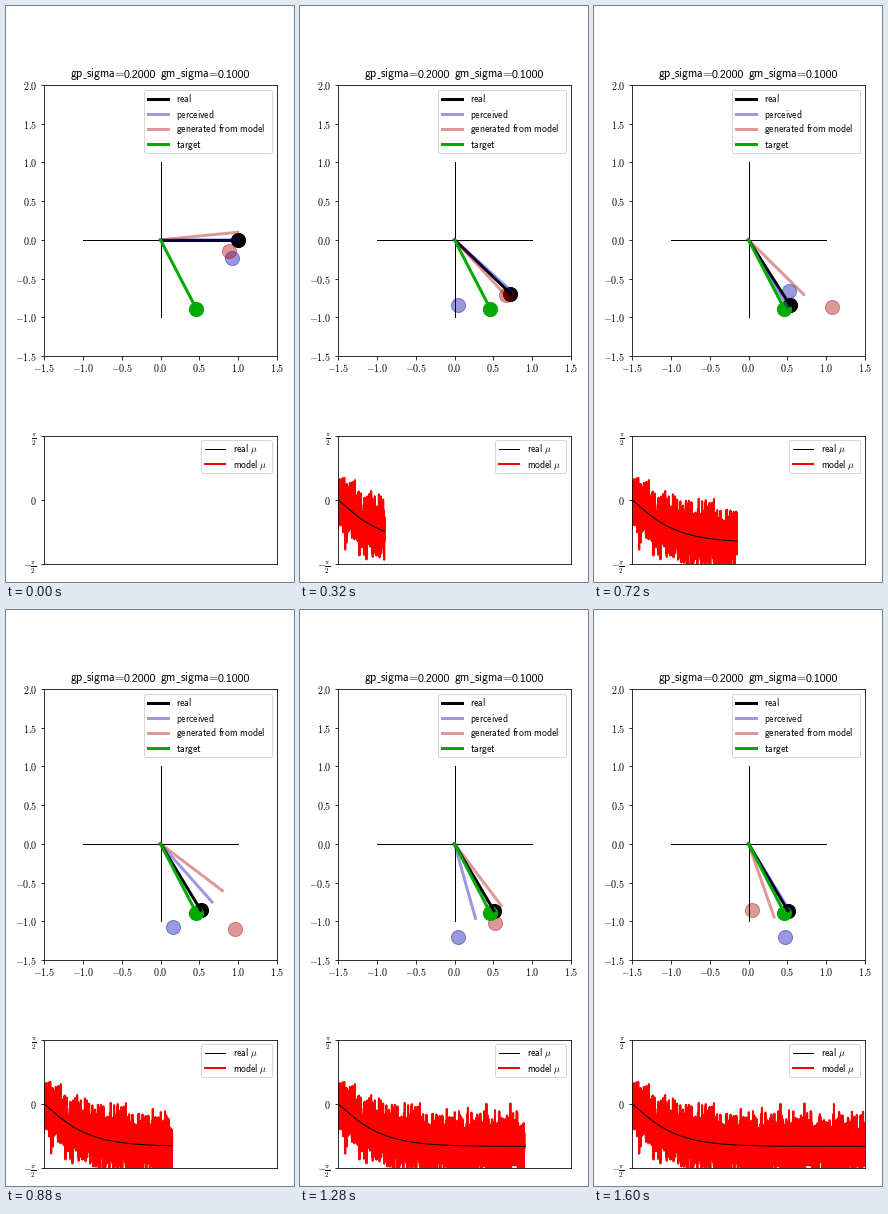
A matplotlib script for the animation above (1.68 s loop, 288 px wide and 576 px high).

```python
import numpy as np
import matplotlib.pyplot as plt
from matplotlib.animation import FuncAnimation
from matplotlib.patches import FancyBboxPatch

W, H, DPI = 288, 576, 72
FRAMES, INTERVAL = 21, 80
SAMPLES = 200  # model samples drawn per frame
BLUE, RED, GREEN = "#0000aa", "#aa0000", "#00aa00"
TARGET = -1.0926

plt.rcParams["mathtext.fontset"] = "cm"
rng = np.random.default_rng(7)


def mu(t):
    """Real angle, settling towards the target."""
    return -1.04 * (1 - np.exp(-(t / 3.13) ** 1.17))


def tip(angle):
    return np.array([np.cos(angle), np.sin(angle)])


def scatter_around(angle, spread):
    """A noisy spot near the tip of an arm, kept inside the plot."""
    spot = tip(angle) + rng.normal(0, spread, 2)
    return np.clip(spot, (-.39, -1.2), (1.44, .75))


def noisy_reading(t):
    seen = mu(t) + rng.normal(0, .2)
    model = mu(t) + rng.normal(0, .33)
    return seen, scatter_around(mu(t), .27), model, scatter_around(model, .25)


readings = [noisy_reading(t) for t in range(FRAMES)]
times = np.linspace(0, FRAMES - 1, (FRAMES - 1) * SAMPLES + 1)
real_mu = mu(times)
model_mu = real_mu + rng.normal(0, .33, times.size)

fig = plt.figure(figsize=(W / DPI, H / DPI), dpi=DPI, facecolor="white")


def axes_px(left, top, right, bottom):
    return fig.add_axes([left / W, 1 - bottom / H,
                         (right - left) / W, (bottom - top) / H])


# Pendulum plot
ax = axes_px(38, 79, 271, 350)
ax.set(xlim=(-1.5, 1.5), ylim=(-1.5, 2))
xt, yt = np.arange(-1.5, 1.6, .5), np.arange(-1.5, 2.1, .5)
ax.set_xticks(xt, [f"${v:.1f}$" for v in xt])
ax.set_yticks(yt, [f"${v:.1f}$" for v in yt])
ax.tick_params(axis="x", pad=3)
ax.plot([-1, 1], [0, 0], color="black", lw=1)
ax.plot([0, 0], [-1, 1], color="black", lw=1)


def make_arm(color, alpha=1):
    rod, = ax.plot([], [], color=color, lw=3, alpha=alpha)
    bob, = ax.plot([], [], "o", color=color, ms=14.14, mew=1,
                   alpha=alpha, zorder=1)
    return rod, bob


def set_arm(arm, angle, spot=None):
    end = tip(angle)
    x, y = end if spot is None else spot
    arm[0].set_data([0, end[0]], [0, end[1]])
    arm[1].set_data([x], [y])


real = make_arm("black")
perceived = make_arm(BLUE, .4)
generated = make_arm(RED, .4)
target = make_arm(GREEN)
set_arm(target, TARGET)

# Angle history
hist = axes_px(38, 430, 271, 558)
hist.set(xlim=(0, FRAMES - 1), ylim=(-np.pi / 2, np.pi / 2), xticks=[])
hist.set_yticks([-np.pi / 2, 0, np.pi / 2],
                [r"$-\frac{\pi}{2}$", "$0$", r"$\frac{\pi}{2}$"])
model_line, = hist.plot([], [], color="red", lw=2)
real_line, = hist.plot([], [], color="black", lw=1)

# Title and legends, laid out in pixels
top = fig.add_axes([0, 0, 1, 1], zorder=5)
top.set(xlim=(0, W), ylim=(H, 0))
top.axis("off")


def label(x, y, text, size):
    top.text(x, y, f"${text}$", fontsize=size, va="baseline")


def sans(text):
    return r"\mathsf{" + text.replace(" ", r"\ ") + "}"


def setting(x, name, value, base=71.5):
    """Title part such as gp_sigma=0.2000, starting at x."""
    rule = x + (12.4 if name == "gp" else 15.7)
    label(x, base, sans(name), 11.8)
    top.plot([rule, rule + 3.6], [base, base], color="black", lw=.8,
             solid_capstyle="butt")
    label(rule + 3.8, base, sans("sigma") + r"\hspace{-0.2}=", 11.8)
    top.text(rule + 41.3, base, value, fontsize=10.6, va="baseline",
             family="Liberation Sans")


def legend(x, y, right, rows):
    height = 15 * len(rows) + 3
    top.add_patch(FancyBboxPatch(
        (x, y), right - x, height, boxstyle="round,pad=0,rounding_size=2",
        fc="white", ec="0.8", lw=1, alpha=.8))
    for k, (text, color, lw, alpha) in enumerate(rows):
        row = y + 8.5 + 15 * k
        top.plot([x + 3.5, x + 23.5], [row, row], color=color, lw=lw,
                 alpha=alpha)
        label(x + 31.5, row + 3.5, text, 9.7)


setting(64.3, "gp", "0.2000")
setting(154.5, "gm", "0.1000")

legend(138.5, 84.5, 266.5, [
    (sans("real"), "black", 3, 1),
    (sans("perceived"), BLUE, 3, .4),
    (sans("generated from model"), RED, 3, .4),
    (sans("target"), GREEN, 3, 1),
])
legend(195.5, 434.5, 266.5, [
    (sans("real") + r"\ \mu", "black", 1, 1),
    (sans("model") + r"\ \mu", "red", 2, 1),
])


def update(i):
    seen, seen_spot, model, model_spot = readings[i]
    set_arm(real, mu(i))
    set_arm(perceived, seen, seen_spot)
    set_arm(generated, model, model_spot)
    n = i * SAMPLES + 1 if i else 0
    model_line.set_data(times[:n], model_mu[:n])
    real_line.set_data(times[:n], real_mu[:n])
    return ()


anim = FuncAnimation(fig, update, frames=FRAMES, interval=INTERVAL,
                     repeat=True, repeat_delay=0)
plt.show()
```
